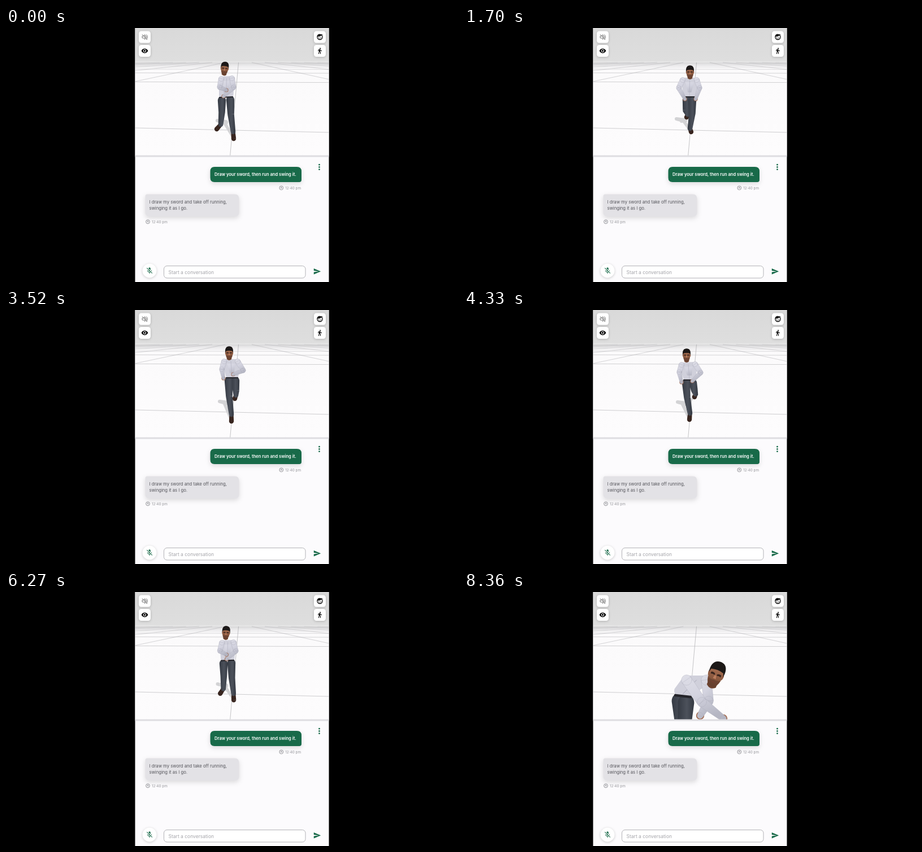
Write an HTML page that moves like this. It is 800 px wide and 450 px high and loops after 8390 ms.

```html
<!DOCTYPE html>
<html lang="en">
<head>
<meta charset="utf-8">
<title>Character chat</title>
<style>
html, body { margin: 0; width: 100%; height: 100%; overflow: hidden; background: #000; }
svg { display: block; width: 100vw; height: 100vh; font-family: Inter, "Open Sans", sans-serif; }
.button { fill: #fff; filter: drop-shadow(0 1px 2px #0003); }
.bubble { filter: drop-shadow(0 3px 4px #0002); }
.small { font-size: 6.4px; fill: #96969b; }
.round { stroke-linejoin: round; stroke-linecap: round; }
</style>
</head>
<body>
<svg viewBox="0 0 800 450">
  <defs>
    <linearGradient id="floor" x1="0" y1="0" x2="0" y2="1">
      <stop offset="0" stop-color="#d9d9d9"/><stop offset=".255" stop-color="#dedede"/>
      <stop offset=".295" stop-color="#fbfafb"/><stop offset="1" stop-color="#fdfcfd"/>
    </linearGradient>
    <linearGradient id="shirt" x1="0" y1="0" x2=".35" y2="1">
      <stop offset="0" stop-color="#dfdfe8"/><stop offset=".5" stop-color="#d3d3df"/><stop offset="1" stop-color="#b5b6c3"/>
    </linearGradient>
    <linearGradient id="pants">
      <stop offset="0" stop-color="#353a43"/><stop offset=".55" stop-color="#4c515b"/><stop offset="1" stop-color="#343942"/>
    </linearGradient>
    <linearGradient id="skin" x1="0" y1="0" x2="0" y2="1">
      <stop offset="0" stop-color="#ab7154"/><stop offset="1" stop-color="#70462f"/>
    </linearGradient>
    <clipPath id="view"><rect x="228.5" width="343" height="226"/></clipPath>
  </defs>

  <rect width="800" height="450"/>
  <rect x="228.5" width="343" height="450" fill="#fcfbfd"/>
  <g clip-path="url(#view)">
    <rect x="228" width="344" height="226" fill="url(#floor)"/>
    <g id="grid" stroke="#a9a9ab" stroke-width=".75"></g>
    <g id="figure"></g>
  </g>
  <rect x="228.5" y="225.5" width="343" height="3" fill="#dedde1"/>

  <g id="buttons"></g>
  <g fill="none" stroke="#666" stroke-width=".9">
    <path d="M241 14.3h2l3-2.5v8.4l-3-2.5h-2zM247.5 13.5q2 2.5 0 5M248.3 11.5q4.2 4.2 0 9M241 11.3l9 9.5"/>
  </g>
  <g transform="translate(555.5 16)">
    <circle r="4.6" fill="#fff" stroke="#111" stroke-width="1.3"/>
    <path d="M-5 -1Q-4 -6 1 -5L3-3Q0 0-5-1M2-5l1.3 2 2-1.2z" fill="#111"/>
    <circle cx="-1.7" cy="1" r=".8"/><circle cx="1.8" cy="1" r=".8"/>
    <path d="M-1.5 2.8q1.5 1 3 0" fill="none" stroke="#111" stroke-width=".7"/>
  </g>
  <path transform="translate(239.1 34.1) scale(.53)" fill-rule="evenodd" d="M12 4.5C7 4.5 2.73 7.61 1 12c1.73 4.39 6 7.5 11 7.5s9.27-3.11 11-7.5c-1.73-4.39-6-7.5-11-7.5zM12 17c-2.76 0-5-2.24-5-5s2.24-5 5-5 5 2.24 5 5-2.24 5-5 5zm0-8c-1.66 0-3 1.34-3 3s1.34 3 3 3 3-1.34 3-3-1.34-3-3-3z"/>
  <path transform="translate(549.4 34.4) scale(.5)" d="M13.5 5.5c1.1 0 2-.9 2-2s-.9-2-2-2-2 .9-2 2 .9 2 2 2zM9.8 8.9L7 23h2.1l1.8-8 2.1 2v6h2v-7.5l-2.1-2 .6-3C14.8 12 16.8 13 19 13v-2c-1.9 0-3.5-1-4.3-2.4l-1-1.6c-.4-.6-1-1-1.7-1-.3 0-.5.1-.8.1L6 8.3V13h2V9.6l1.8-.7z"/>

  <g fill="#186a49">
    <circle cx="554.5" cy="242.2" r="1.4"/><circle cx="554.5" cy="246.4" r="1.4"/><circle cx="554.5" cy="250.6" r="1.4"/>
    <path class="bubble" d="M369 246H515q8 0 8 8V269q0 4-4 4H369q-7.5 0-7.5-8V254q0-8 7.5-8z"/>
  </g>
  <text x="369" y="261.8" font-size="7.55" font-weight="600" fill="#fff">Draw your sword, then run and swing it.</text>
  <path class="bubble" fill="#e3e2e6" d="M250 294.5H405q7.5 0 7.5 8V326q0 8-7.5 8H254q-7.5 0-7.5-8V298q0-3.5 3.5-3.5z"/>
  <g font-size="7.7" fill="#55555b">
    <text x="253.5" y="310.5">I draw my sword and take off running,</text>
    <text x="253.5" y="321.5">swinging it as I go.</text>
  </g>
  <text class="small" x="522" y="286" text-anchor="end">12:40 pm</text>
  <text class="small" x="258" y="346">12:40 pm</text>
  <g id="clocks" fill="none" stroke="#85858b" stroke-width=".9"></g>

  <circle class="button" cx="254" cy="430" r="12.5"/>
  <rect x="279.5" y="421.5" width="250.5" height="21.5" rx="5.5" fill="#fff" stroke="#aaaaae" stroke-width=".9"/>
  <text x="287.5" y="435.6" font-size="8.5" fill="#a5a5aa">Start a conversation</text>
  <g fill="#186a49">
    <path transform="translate(247.2 423) scale(.57)" d="M19 11h-1.7c0 .74-.16 1.43-.43 2.05l1.23 1.23c.56-.98.9-2.09.9-3.28zm-4.02.17c0-.06.02-.11.02-.17V5c0-1.66-1.34-3-3-3S9 3.34 9 5v.18l5.98 5.99zM4.27 3L3 4.27l6.01 6.01V11c0 1.66 1.33 3 2.99 3 .22 0 .44-.03.65-.08l1.66 1.66c-.71.33-1.5.52-2.31.52-2.76 0-5.3-2.1-5.3-5.1H5c0 3.41 2.72 6.23 6 6.72V21h2v-3.28c.91-.13 1.77-.45 2.54-.9L19.73 21 21 19.73 4.27 3z"/>
    <path transform="translate(543.6 424.2) scale(.59)" d="M2.01 21L23 12 2.01 3 2 10l15 2-15 2z"/>
  </g>
</svg>

<script>
const LOOP = 8390, STRIDE = 728, RUN_REF = 1700;
const $ = id => document.getElementById(id);
function add(parent, tag, attrs = {}) {
  const node = document.createElementNS("http://www.w3.org/2000/svg", tag);
  set(node, attrs);
  return parent.appendChild(node);
}
function set(node, attrs) {
  for (const key in attrs) node.setAttribute(key, attrs[key]);
}

// Perspective floor
for (let n = 0; n < 11; n++) {
  const y = 56 + 1 / (.008 + .017 * n), tilt = 500 / (125 + 700 * n);
  add($("grid"), "line", { x1: 228, x2: 572, y1: y - tilt, y2: y + tilt, opacity: Math.max(.25, .75 - n * .06) });
}
for (let k = -6; k <= 6; k++) {
  const slope = k * 4.65 - .09;
  add($("grid"), "line", { x1: 412 + slope * 5, y1: 61, x2: 412 + slope * 170, y2: 226, opacity: k ? .7 - Math.abs(k) * .07 : .9 });
}
for (const x of [235, 545]) for (const y of [5.5, 30])
  add($("buttons"), "rect", { class: "button", x, y, width: 21, height: 21, rx: 4.5 });
for (const [x, y] of [[487.3, 283.3], [251, 343.3]]) {
  add($("clocks"), "circle", { cx: x, cy: y, r: 3.4 });
  add($("clocks"), "path", { d: `M${x} ${y - 2}v2.3h1.7M${x - 1.6} ${y}h1.2` });
}

// Joints: head, then left/right pairs as seen by the viewer, then shadow, size, head tilt
const JOINTS = "head shoulderL shoulderR elbowL elbowR handL handR hipL hipR kneeL kneeR ankleL ankleR toeL toeR shadow".split(" ");
const drawSword = [387,71.5, 381,90, 400,89, 378,105, 403,105, 390,110, 385,121, 382,128, 397,127,
  382,149, 398,153, 380,171, 402,184, 373,179, 403,196, 383,168, 1, 6];
const rightStep = [400,78, 387,92, 412,92, 380,106, 417,106, 391,126, 410,126, 394,127, 404,127,
  393,146, 404,151, 396,153, 400,178, 394,158, 402,184, 385,165, 1, 0];
const rightLand = [399,70.5, 386,87, 412,87, 377,100, 418,100, 397,108, 412,111, 394,120, 404,120,
  396,142, 403,153, 399,161, 403,184, 397,168, 402,195, 383,163, 1, 0];
const leftStep = [395,76, 386,91, 410,91, 382,105, 420,107, 385,121, 402,114, 394,125, 406,125,
  395,153, 407,143, 399,185, 407,151, 399,197, 405,157, 387,166, 1, 0];
const leftLand = [394,80, 385,97, 409,96, 381,110, 419,111, 385,128, 404,126, 393,129, 405,129,
  395,155, 408,143, 400,183, 410,149, 399,194, 408,154, 387,167, 1, 0];
const swing = [387,74.5, 385,92, 401,92, 377,104, 389,109, 357,107, 363,109, 390,126, 403,125,
  381,149, 406,154, 384,169, 406,183, 380,177, 407,193, 370,166, 1, 8];
const crouch = [446,146, 394,156, 429,156, 421,195, 433,193, 459,224, 418,219, 382,193, 393,196,
  386,240, 390,240, 386,300, 398,300, 380,320, 402,320, 396,250, 2, 22];
const cycle = [[0, rightStep], [50 / STRIDE, rightLand], [.5, leftStep], [446 / STRIDE, leftLand], [1, rightStep]];

const ease = u => { u = Math.min(1, Math.max(0, u)); return u * u * (3 - 2 * u); };
const blend = (a, b, u) => a.map((v, i) => v + (b[i] - v) * ease(u));
const span = (t, from, to) => (t - from) / (to - from);

function run(t) {
  const phase = ((t - RUN_REF) / STRIDE % 1 + 1) % 1;
  const i = Math.max(1, cycle.findIndex(key => key[0] > phase));
  const [from, a] = cycle[i - 1], [to, b] = cycle[i];
  return blend(a, b, span(phase, from, to));
}
function poseAt(t) {
  if (t < 900) return blend(drawSword, swing, span(t, 100, 900));
  if (t < 5900) return blend(swing, run(t), span(t, 900, 1350));
  if (t < 6450) return blend(run(t), drawSword, span(t, 5900, 6450));
  if (t < 7120) return blend(drawSword, swing, span(t, 6450, 7120));
  return blend(swing, crouch, span(t, 7120, 8360));
}

// Outline of a tapered chain of [x, y, radius] points
function limb(...pts) {
  let d = "";
  pts.forEach(([x, y, r], i) => {
    d += `M${x + r} ${y}a${r} ${r} 0 1 0 ${-2 * r} 0a${r} ${r} 0 1 0 ${2 * r} 0z`;
    if (!i) return;
    const [px, py, pr] = pts[i - 1], len = Math.hypot(x - px, y - py) || 1;
    const nx = (py - y) / len, ny = (x - px) / len;
    d += `M${px + nx * pr} ${py + ny * pr}L${x + nx * r} ${y + ny * r}L${x - nx * r} ${y - ny * r}L${px - nx * pr} ${py - ny * pr}z`;
  });
  return d;
}

const figure = $("figure");
const shape = (fill, parent = figure) => add(parent, "path", { fill, class: "round" });
const shadow = shape("#d3d3d5");
const legs = add(figure, "g");
const leg = {}, arm = {};
for (const side of "LR") {
  const g = add(legs, "g");
  leg[side] = { g, shoe: shape("#38251f", g), cloth: shape("url(#pants)", g) };
}
const torso = shape("url(#shirt)"), belt = shape("none"), placket = shape("none");
set(torso, { stroke: "#d0d0db" });
set(belt, { stroke: "#25252a" });
set(placket, { stroke: "#a9a9b8" });
for (const side of "RL") {
  arm[side] = { hand: shape("#a4694b"), cloth: shape("url(#shirt)") };
  set(arm[side].cloth, { stroke: "#a6a6b5", "stroke-width": .35 });
}
const head = add(figure, "g");
const feature = (d, fill) => set(shape(fill, head), { d });
feature("M-4 4L-4.3 11Q0 15 4.3 11L4 4z", "#6d432f");
feature("M-6.5-2Q-8-1-6.5 3L6.5 3Q8-1 6.5-2z", "#8e5a42");
feature("M-6.2-5L-6 4Q-4.5 11.5 0 11.5T6 4L6.2-5Q0-9-6.2-5z", "url(#skin)");
feature("M-5.7 4Q-3 5.8 0 5Q3 5.8 5.7 4Q4.5 11.5 0 11.5T-5.7 4z", "#5f3d2f99");
feature("M-4.8-.7Q-3-1.8-1-.4V.9Q-3 .2-4.7 1zM4.8-.7Q3-1.8 1-.4V.9Q3 .2 4.7 1z", "#38241d");
feature("M-.8 1L-1.4 4H1.4L.8 1z", "#ba7d5e");
feature("M-2.2 7Q0 6.3 2.2 7Q0 8.2-2.2 7z", "#754033");
feature("M-6.8 0C-8-8-5-11.8 0-11.8S8-8 6.8 0L5.7-3.2Q0-5-5.7-3.2z", "#1c1817");

function render(t) {
  const pose = poseAt(t), size = pose[32], tilt = pose[33], p = {};
  JOINTS.forEach((name, i) => p[name] = [pose[2 * i], pose[2 * i + 1]]);
  const at = (name, r) => [...p[name], r * size];
  const shift = (name, dx, dy) => [p[name][0] + dx * size, p[name][1] + dy * size];

  const [sx, sy] = p.shadow;
  set(shadow, { d: limb([sx - 9, sy - 4, 3], [sx + 6, sy - 1, 4]) +
    limb([sx, sy, 3], at("toeL", 2)) + limb([sx + 4, sy, 3], at("toeR", 2)) });

  for (const s of "LR") {
    set(leg[s].cloth, { d: limb(at("hip" + s, 7.2), at("knee" + s, 5.8), at("ankle" + s, 4.3)) });
    set(leg[s].shoe, { d: limb(at("ankle" + s, 3.6), at("toe" + s, 4.2)) });
    set(arm[s].cloth, { d: limb(at("shoulder" + s, 4.6), at("elbow" + s, 4.2), at("hand" + s, 2.7)) });
    set(arm[s].hand, { d: limb(at("hand" + s, 3.6)) });
  }
  legs.appendChild(p.toeL[1] > p.toeR[1] ? leg.L.g : leg.R.g);

  const outline = [p.shoulderL, p.shoulderR, shift("hipR", 1.5, -9), shift("hipL", -1, -9)];
  set(torso, { d: "M" + outline.join("L") + "z", "stroke-width": 8 * size });
  set(belt, { d: `M${shift("hipL", -4, -5)}L${shift("hipR", 4, -5)}`, "stroke-width": 2.2 * size });
  const mid = (a, b) => [(a[0] + b[0]) / 2, (a[1] + b[1]) / 2];
  const neck = mid(p.shoulderL, p.shoulderR);
  set(placket, { d: `M${neck}L${mid(shift("hipL", 0, -7), shift("hipR", 0, -7))}`, "stroke-width": .5 * size });
  set(head, { transform: `translate(${p.head}) rotate(${tilt}) scale(${size})` });
}

const start = performance.now();
function tick(now) {
  render(Math.max(0, now - start) % LOOP);
  requestAnimationFrame(tick);
}
render(0);
requestAnimationFrame(tick);
</script>
</body>
</html>
```
